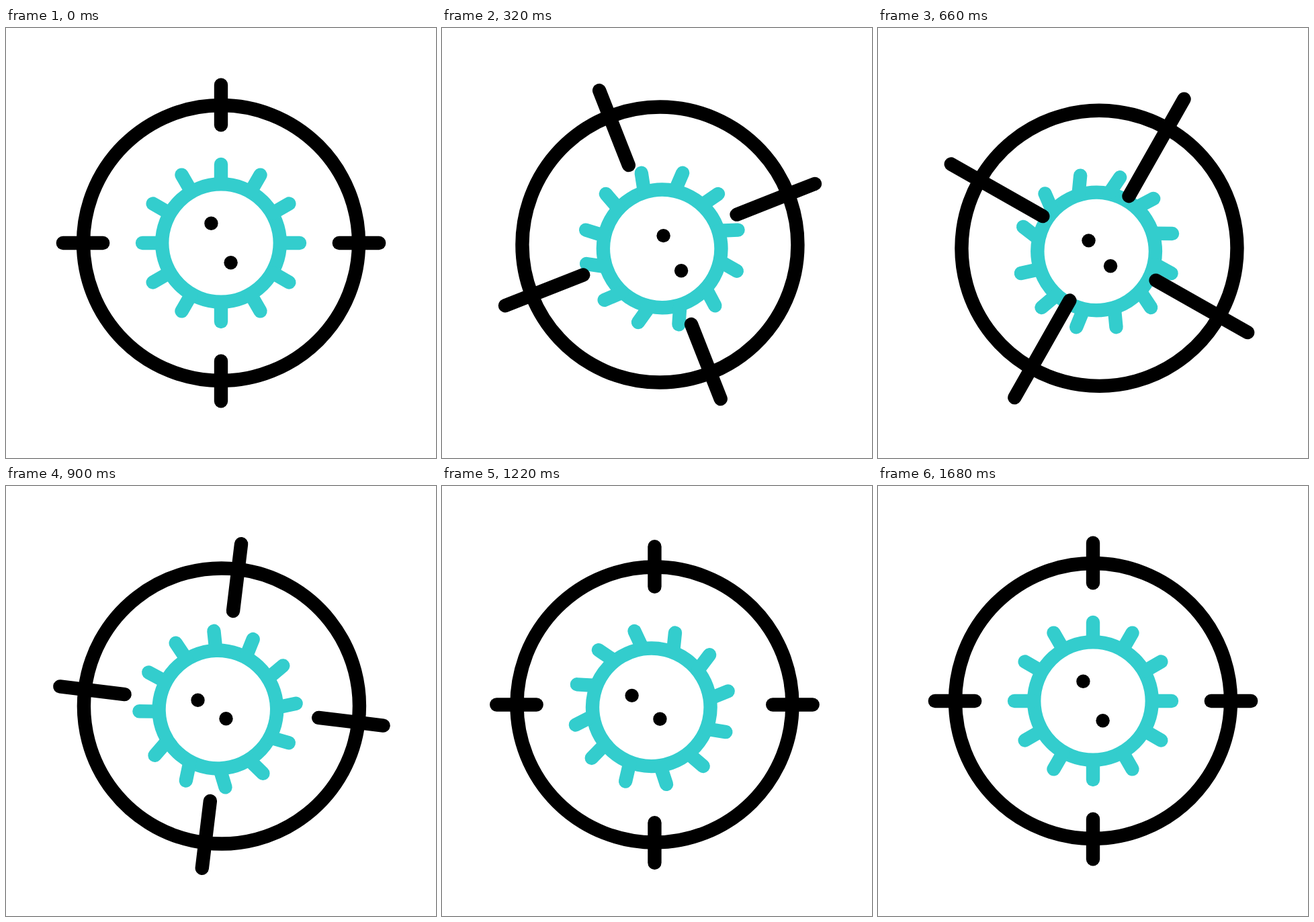
An HTML page for the animation above (1700 ms loop, 640 by 640 pixels).

```html
<!DOCTYPE html>
<html lang="en">
<head>
<meta charset="utf-8">
<title>Virus in crosshair</title>
<style>
html, body { margin: 0; width: 100%; height: 100%; overflow: hidden; background: #fff; }
svg { display: block; width: 100%; height: 100%; }
.line { fill: none; stroke-width: 20.4; stroke-linecap: round; }
</style>
</head>
<body>
<svg viewBox="0 0 640 640">
  <g id="virus" class="line" stroke="#33cdcd"><circle r="87.8"/></g>
  <circle id="dotA" r="10.2"/>
  <circle id="dotB" r="10.2"/>
  <g id="scope" class="line" stroke="#000"><circle r="205"/></g>
</svg>
<script>
const LOOP = 1700, STEP = 20, SPIKES = 12;
const $ = id => document.getElementById(id);
const clamp = u => Math.min(Math.max(u, 0), 1);
const smooth = u => u * u * (3 - 2 * u);

function addLines(parent, count) {
  return Array.from({ length: count }, () =>
    parent.appendChild(document.createElementNS('http://www.w3.org/2000/svg', 'line')));
}

// Finds the leg being travelled and the eased progress on it.
function legAt(keys, t) {
  let i = 1;
  while (i < keys.length - 1 && t >= keys[i].t) i++;
  const from = keys[i - 1], to = keys[i];
  return { from, to, p: smooth(clamp((t - from.t) / (to.t - from.t))) };
}

// Swings from zero to a high, over to a low, and back to zero.
function swing(highTime, high, lowTime, low, end) {
  const keys = [{ t: 0, v: 0 }, { t: highTime, v: high }, { t: lowTime, v: low }, { t: end, v: 0 }];
  return t => {
    const { from, to, p } = legAt(keys, t);
    return from.v + (to.v - from.v) * p;
  };
}

// Moves through points; bow bends the leg that ends there downwards.
function travel(home, keys) {
  return t => {
    const { from, to, p } = legAt(keys, t);
    const bow = 4 * p * (1 - p) * (to.bow || 0);
    return [home[0] + from.x + (to.x - from.x) * p,
            home[1] + from.y + (to.y - from.y) * p + bow];
  };
}

const virusAt = travel([320, 320], [
  { t: 0, x: 0, y: 0 },
  { t: 450, x: 9.6, y: 10.5 },
  { t: 1110, x: -9.1, y: 10.9, bow: 2.5 },
  { t: 1680, x: 0, y: 0, bow: -1.5 }]);
const dotAAt = travel([305.4, 290.7], [
  { t: 0, x: 0, y: 0 },
  { t: 400, x: 27, y: 20.6 },
  { t: 1060, x: -28, y: 27.5, bow: 3 },
  { t: 1640, x: 0, y: 0, bow: -2 }]);
const dotBAt = travel([334.6, 349.3], [
  { t: 0, x: 0, y: 0 },
  { t: 400, x: 24, y: 13.4 },
  { t: 1060, x: -12.5, y: -4.5, bow: -2.5 },
  { t: 1640, x: 0, y: 0, bow: 1.9 }]);
const scopeAt = travel([320, 320], [
  { t: 80, x: 0, y: 0 },
  { t: 600, x: 10, y: 7.8, bow: -0.9 },
  { t: 1100, x: -4, y: 6.2, bow: 0.8 },
  { t: 1680, x: 0, y: 0 }]);

const virusTurn = swing(490, 17.4, 1120, -9.5, 1680);
const lean = swing(370, 27, 965, -18.7, 1400);
const reach = swing(580, 88, 1120, 0, LOOP);

// A quarter turn that picks up speed a little early.
function scopeTurn(t) {
  const p = clamp(t / 1085);
  return -90 * smooth(p + 0.22 * p * (1 - p) ** 3);
}

const spikes = addLines($('virus'), SPIKES);
spikes.forEach(s => s.setAttribute('y2', -28));
const ticks = addLines($('scope'), 4);

function place(el, [x, y], turn = 0) {
  el.setAttribute('transform', `translate(${x} ${y}) rotate(${turn})`);
}

function draw(t) {
  place($('virus'), virusAt(t), virusTurn(t));
  place($('dotA'), dotAAt(t));
  place($('dotB'), dotBAt(t));
  place($('scope'), scopeAt(t), scopeTurn(t));

  // The lean runs around the ring, one step later for each spike.
  spikes.forEach((spike, k) => {
    const tilt = lean(t - STEP * (SPIKES - 1 - k));
    spike.setAttribute('transform', `rotate(${270 + 30 * k}) translate(0 -89) rotate(${tilt})`);
  });

  // The sideways pair grows slightly more than the upright pair.
  ticks.forEach((tick, k) => {
    const grow = reach(t) * (k % 2 ? 1.045 : 0.955);
    tick.setAttribute('y1', -235.2 - 0.235 * grow);
    tick.setAttribute('y2', -175.8 + grow);
    tick.setAttribute('transform', `rotate(${90 * k})`);
  });
}

const start = performance.now();
function frame() {
  const t = (performance.now() - start) % LOOP;
  draw(Math.floor(t / STEP) * STEP);
  requestAnimationFrame(frame);
}
frame();
</script>
</body>
</html>
```
